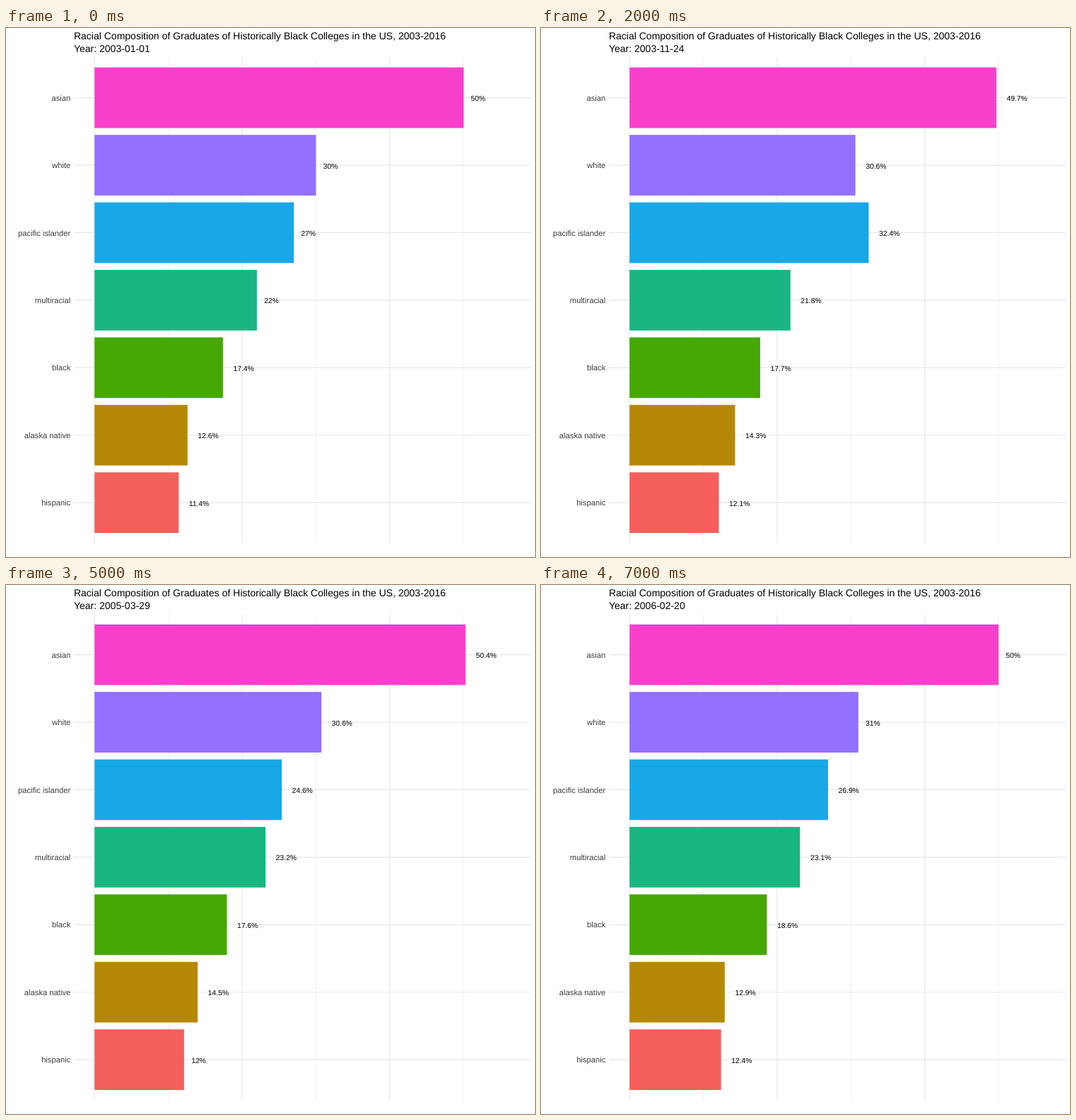
Recreate the animation shown at these times as an HTML page. Size 748 by 748 pixels, loop 8 s.

```html
<!DOCTYPE html>
<html lang="en">
<head>
<meta charset="utf-8">
<title>Bar chart by year</title>
<style>
  html, body { margin: 0; width: 100%; height: 100%; overflow: hidden; background: #fff; }
  svg { display: block; width: 100vw; height: 100vh; }
  text { font-family: "Liberation Sans", Arial, sans-serif; text-rendering: geometricPrecision; }
  .title { font-size: 14.03px; }
  .name { font-size: 11.22px; fill: #3d3d3d; text-anchor: end; }
  .value { font-size: 10.32px; }
  .grid { stroke: #e7e7e7; }
</style>
</head>
<body>
<svg id="stage" viewBox="0 0 748 748"></svg>
<script>
const stage = document.getElementById("stage");
const STEP = 1000, STEPS = 8;
const X0 = 125.2, UNIT = 10.436;            // pixels per percent
const TOP = 98.6, ROW = 95.43, BAR = 85.7;
const LEFT = 96.2, RIGHT = 742.8;
const DAY = 864e5, START = Date.UTC(2003, 0, 1), DAYS = 4748 / 29;
const KEYS = [0, 2, 4, 7];                  // step at which each year is reached

// name, colour, yearly percentages
const rows = [
  ["asian", "#f940cd", [50, 49.7, 50.4, 50]],
  ["white", "#9370ff", [30, 30.6, 30.6, 31]],
  ["pacific islander", "#18a7e8", [27, 32.4, 24.6, 26.9]],
  ["multiracial", "#19b583", [22, 21.8, 23.2, 23.1]],
  ["black", "#45a805", [17.4, 17.7, 17.6, 18.6]],
  ["alaska native", "#b58907", [12.6, 14.3, 14.5, 12.9]],
  ["hispanic", "#f45f5b", [11.4, 12.1, 12, 12.4]]
];

function add(tag, attrs, text = "") {
  const el = document.createElementNS("http://www.w3.org/2000/svg", tag);
  for (const k in attrs) el.setAttribute(k, attrs[k]);
  el.textContent = text;
  return stage.appendChild(el);
}

function line(x1, y1, x2, y2, w) {
  add("line", { class: "grid", x1, y1, x2, y2, "stroke-width": w });
}

const rowY = i => TOP + i * ROW;

for (let p = 0; p <= 50; p += 10) {
  const x = X0 + p * UNIT;
  line(x, TOP - 0.6 * ROW, x, rowY(6) + 0.6 * ROW, p % 20 ? 0.7 : 1.2);
}
rows.forEach((r, i) => line(LEFT, rowY(i), RIGHT, rowY(i), 1.2));

add("text", { class: "title", x: 95.9, y: 16 },
  "Racial Composition of Graduates of Historically Black Colleges in the US, 2003-2016");
const date = add("text", { class: "title", x: 95.9, y: 33.8 });

const bars = rows.map(([name, fill], i) => {
  const y = rowY(i);
  add("text", { class: "name", x: 91.3, y: y + 4.1 }, name);
  return {
    rect: add("rect", { x: X0, y: y - BAR / 2, height: BAR, fill }),
    label: add("text", { class: "value", y: y + 4.5 })
  };
});

// Half the label's own width separates it from the bar.
function gap(s) {
  const em = [...s].reduce((w, c) => w + (c === "." ? 0.278 : c === "%" ? 0.889 : 0.556), 0);
  return em * 10.32 / 2;
}

function draw(step) {
  let k = 0;
  while (k < KEYS.length - 2 && step >= KEYS[k + 1]) k++;
  const p = (step - KEYS[k]) / (KEYS[k + 1] - KEYS[k]);
  const day = new Date(START + Math.floor(step * DAYS) * DAY);
  date.textContent = "Year: " + day.toISOString().slice(0, 10);
  rows.forEach(([, , v], i) => {
    const { rect, label } = bars[i];
    const width = (v[k] + (v[k + 1] - v[k]) * p) * UNIT;
    const text = v[p < 0.5 ? k : k + 1] + "%";
    rect.setAttribute("width", width);
    label.setAttribute("x", X0 + width + gap(text));
    label.textContent = text;
  });
}

let shown = -1;
function tick() {
  const step = Math.floor(performance.now() / STEP) % STEPS;
  if (step !== shown) draw(shown = step);
  requestAnimationFrame(tick);
}
tick();
</script>
</body>
</html>
```
